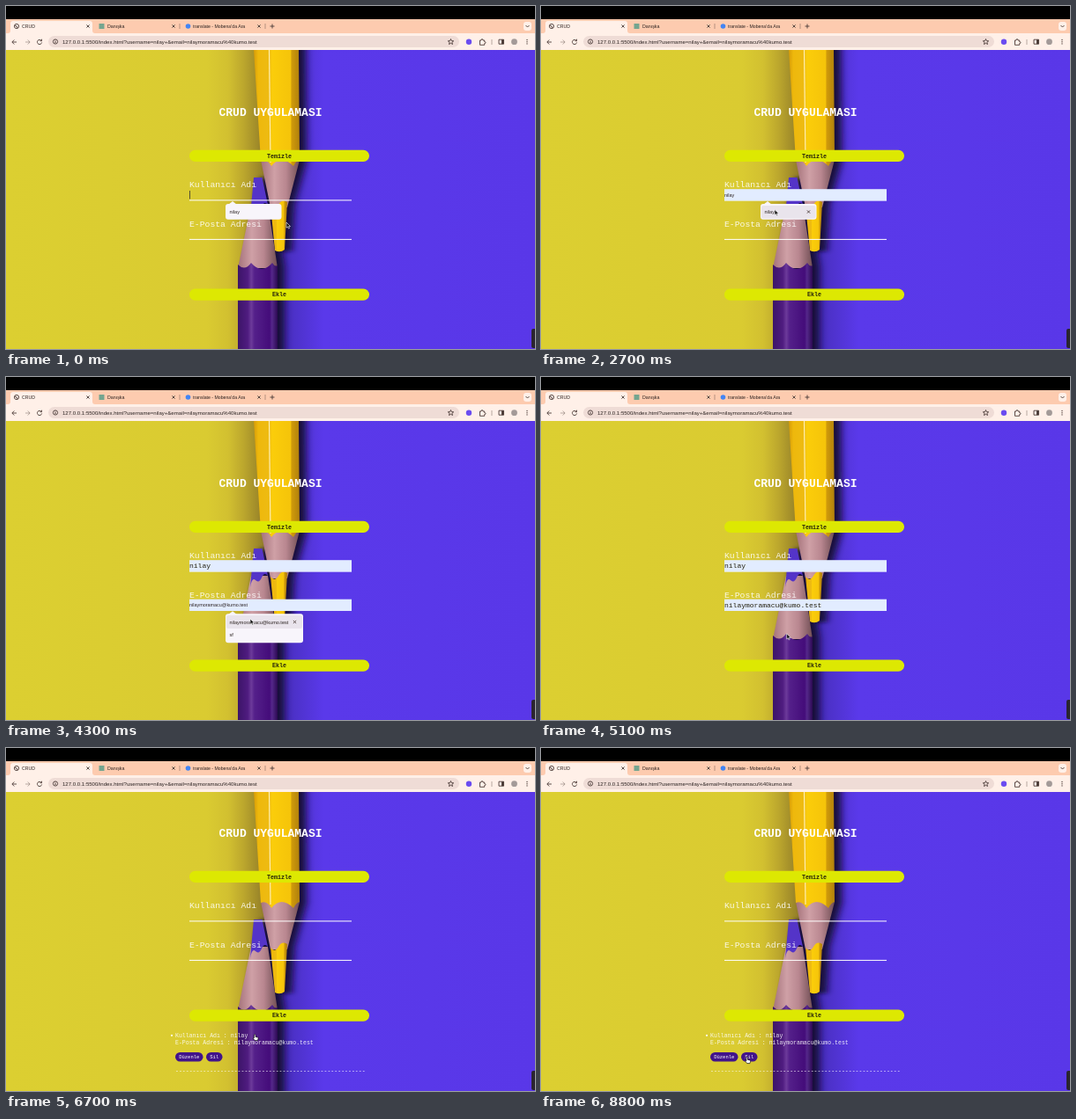
These frames come from a looping animation (600 px wide and 390 px high, 8900 ms). An HTML page:

```html
<!DOCTYPE html>
<html lang="tr">
<head>
<meta charset="utf-8">
<title>CRUD</title>
<style>
  html, body { margin: 0; width: 100%; height: 100%; overflow: hidden; background: #000; }
  svg { display: block; width: 600px; height: 390px; }
  text { white-space: pre; }
  .ui { font-family: "Liberation Sans", Arial, sans-serif; fill: #2b2220; }
  .mono { font-family: "Liberation Mono", "Courier New", monospace; fill: #fff; }
  .thin { fill-opacity: .88; }
  .bold { font-weight: bold; }
  .dark { fill: #24200c; }
  .line { fill: none; stroke: #4b3c38; stroke-width: .9; }
  .pale { opacity: .45; }
</style>
</head>
<body>
<svg viewBox="0 0 600 390" id="stage">
  <defs>
    <linearGradient id="paper" gradientUnits="userSpaceOnUse" x1="0" x2="600" y1="0" y2="0">
      <stop offset="0" stop-color="#dccf31"/>
      <stop offset=".38" stop-color="#dacb31"/>
      <stop offset=".42" stop-color="#d2c030"/>
      <stop offset=".45" stop-color="#bba62d"/>
      <stop offset=".488" stop-color="#927d28"/>
      <stop offset=".49" stop-color="#3d26a4"/>
      <stop offset=".55" stop-color="#4e32cc"/>
      <stop offset=".6" stop-color="#5a39ea"/>
      <stop offset="1" stop-color="#5937e8"/>
    </linearGradient>
    <linearGradient id="gold">
      <stop offset="0" stop-color="#d79c08"/>
      <stop offset=".1" stop-color="#eeb80c"/>
      <stop offset=".34" stop-color="#eebb12"/>
      <stop offset=".4" stop-color="#fbcd0a"/>
      <stop offset=".8" stop-color="#f5c40a"/>
      <stop offset=".83" stop-color="#cf9a0a"/>
      <stop offset="1" stop-color="#b0800c"/>
    </linearGradient>
    <linearGradient id="violet">
      <stop offset="0" stop-color="#3c1468"/>
      <stop offset=".25" stop-color="#4f1c80"/>
      <stop offset=".34" stop-color="#6c3a9a"/>
      <stop offset=".42" stop-color="#54208a"/>
      <stop offset=".8" stop-color="#440c7a"/>
      <stop offset=".86" stop-color="#54288a"/>
      <stop offset="1" stop-color="#2c0a52"/>
    </linearGradient>
    <linearGradient id="wood">
      <stop offset="0" stop-color="#a4727a"/>
      <stop offset=".35" stop-color="#cfa0a6"/>
      <stop offset=".65" stop-color="#b98790"/>
      <stop offset="1" stop-color="#704e54"/>
    </linearGradient>
    <filter id="soft" x="-1" y="-.2" width="3" height="1.4"><feGaussianBlur stdDeviation="4.500 2"/></filter>
    <clipPath id="page"><path d="M0 50H600V390H0z"/></clipPath>
    <path id="upper" d="M281 40H332L333 176 319 226 316 279H305L300 226 289 176z"/>
    <path id="lower" d="M281 195h9.500L298 228 308 297V400H263V297z"/>
  </defs>

  <rect y="15" width="600" height="17" fill="#fdcbaf"/>
  <path d="M2 31q3 0 3-3v-8q0-3 3-3h87q3 0 3 3v8q0 3 3 3z" fill="#fff0e8"/>
  <rect y="31" width="600" height="19" fill="#fff0e8"/>
  <rect x="48" y="34" width="466" height="13" rx="6.5" fill="#efdcd6"/>
  <rect x="587" y="18" width="9" height="10" rx="3" fill="#fff0e8"/>
  <g id="chrome"></g>

  <g id="photo" clip-path="url(#page)">
    <rect y="50" width="600" height="340" fill="url(#paper)"/>
    <g filter="url(#soft)" fill="#160e38">
      <use href="#upper" x="8"/>
      <use href="#lower" x="8"/>
    </g>
    <path d="M240 50H281L289 176 281 195 263 297V390H240z" fill="url(#paper)"/>
    <path d="M289 175H333L319 229H300z" fill="url(#wood)"/>
    <path d="M300 227q5 6 9-1t10-3l-3 54q-5 4-11 1z" fill="url(#gold)"/>
    <path d="M281 50H332L333 175q-4 1-7 7-14-14-25 0-5-9-12-6z" fill="url(#gold)"/>
    <path d="M298.500 50L300 178" stroke="#ffeeb0" stroke-width="1.200"/>
    <path d="M278 226H297L308 298H263z" fill="url(#wood)"/>
    <path d="M281 195h9.500L297 226q-4-5-7 2t-7 3-6 8z" fill="#5434c8"/>
    <path d="M263 390V294q8 8 15-2 12 14 24 0 3 5 6 3V390z" fill="url(#violet)"/>
  </g>

  <g id="form"></g>
  <g id="popups"></g>
  <rect x="596" y="367" width="6" height="22" rx="2" fill="#2a2530"/>

  <path class="pointer" id="arrow" d="M0 0V6.200L1.500 4.900 2.500 7.100 3.500 6.600 2.600 4.500H4.500z" fill="#111" stroke="#fff" stroke-width=".6"/>
  <path class="pointer" id="beam" d="M-1.500-3.500Q0-3.500 0-2.500Q0-3.500 1.500-3.500M0-2.500V2.500M-1.500 3.500Q0 3.500 0 2.500Q0 3.500 1.500 3.500" fill="none" stroke="#333" stroke-width=".8"/>
  <path class="pointer" id="hand" d="M-.600 0Q.300-1 1 .200V2.400L3.600 3Q4.300 3.400 4 4.600L3.400 6.600H.200L-1.800 4.100Q-1.600 3.200-.600 3.800z" fill="#fff" stroke="#111" stroke-width=".7"/>
</svg>

<script>
const LOOP = 8900, SUBMIT = 6100, SHIFT = -24;
const user = "nilay", mail = "nilaymoramacu@kumo.test";
const $ = id => document.getElementById(id);

const text = (x, y, size, str, cls = "ui", extra = "") =>
  `<text x="${x}" y="${y}" font-size="${size}" class="${cls}" ${extra}>${str}</text>`;
const rect = (x, y, w, h, fill, rx = 0) =>
  `<rect x="${x}" y="${y}" width="${w}" height="${h}" rx="${rx}" fill="${fill}"/>`;
const dot = (x, y, r, fill) => `<circle cx="${x}" cy="${y}" r="${r}" fill="${fill}"/>`;
const stroke = (d, cls = "") => `<path class="line ${cls}" d="${d}"/>`;
const cross = (x, y, r = 1.6) => stroke(`M${x - r} ${y - r}l${2 * r} ${2 * r}m0 ${-2 * r}l${-2 * r} ${2 * r}`);
// Content shown only during the given [from, to) spans
const during = (spans, body) => `<g data-on='${JSON.stringify(spans)}'>${body}</g>`;
const middle = 'text-anchor="middle"';

$("chrome").innerHTML =
  stroke("M9.400 23a2.600 2.600 0 1 0 5.200 0a2.600 2.600 0 1 0-5.200 0M10 22l2 1 1 2") +
  text(18, 24.9, 5.2, "CRUD") +
  rect(105.5, 20, 6, 6, "#74a58f") + text(115, 24.9, 5.3, "Danışka") +
  dot(206.5, 23, 2.8, "#4285f4") + text(212, 24.9, 5.2, "translate - Mobena'da Ara") +
  [93, 190, 287].map(x => cross(x, 23)).join("") +
  stroke("M197 20v6M294 20v6", "pale") +
  stroke("M299.500 23h5M302 20.500v5M589.500 22l2 2 2-2") +
  stroke("M12 41H7M9.300 38.500L6.800 41l2.500 2.500") +
  stroke("M22 41h5M24.700 38.500l2.500 2.500-2.500 2.500", "pale") +
  stroke("M40.200 39.500a2.600 2.600 0 1 0 .4 2M40.500 37.700v2h-2") +
  stroke("M53.400 40.500a2.600 2.600 0 1 0 5.200 0a2.600 2.600 0 1 0-5.200 0M56 40v2M56 38.700v.6") +
  text(64, 42.7, 6.05, `127.0.0.1:5500/index.html?username=${user}+&amp;email=${mail.replace("@", "%40")}`) +
  stroke("M504.500 37.500l.9 2.100 2.300.2-1.800 1.500.6 2.200-2-1.200-2 1.200.6-2.200-1.800-1.500 2.300-.2z") +
  dot(525, 40.7, 3.2, "#6a4cf0") +
  stroke("M537.500 39h1.500q0-1.500 1-1.500t1 1.500h1.700v1.600q1.300 0 1.300 1t-1.300 1v1.700h-5.200z") +
  stroke("M551 38v6", "pale") +
  stroke("M559 38.200h5.500v5h-5.500z") + rect(562, 38.2, 2.6, 5, "#4b3c38") +
  dot(576.5, 40.7, 3.4, "#a39a98") +
  [38.5, 40.7, 42.9].map(y => dot(591, y, .7, "#4b3c38")).join("");

const button = (y, label) =>
  rect(208, y, 204, 13.2, "#dde802", 6.6) +
  text(310, y + 8.7, 6.7, label, "mono bold dark", middle);
const field = (y, label) =>
  text(208, y - 14.3, 9.75, label, "mono thin") + rect(208, y - .1, 184, 1, "#fff");
const fill = (y, value, preview, filled) =>
  during([[preview, SUBMIT]], rect(208, y - 12.3, 184, 13.2, "#e2ecff")) +
  during([[preview, filled]], text(208, y - 3.7, 5.45, value)) +
  during([[filled, SUBMIT]], text(208, y - 3.2, 8, value, "mono dark"));
const pill = (x, w, label) =>
  rect(x, 370, w, 10.6, "#42148a", 5.3) + text(x + w / 2, 377, 5.5, label, "mono", middle);

$("form").innerHTML =
  text(300, 124.7, 13, "CRUD UYGULAMASI", "mono bold", middle) +
  button(163.8, "Temizle") + field(220.5, "Kullanıcı Adı") +
  field(265, "E-Posta Adresi") + button(321.6, "Ekle") +
  fill(220.5, user, 2400, 3000) + fill(265, mail, 4200, 4500) +
  during([[SUBMIT, LOOP]],
    dot(188, 350.8, 1.1, "#fff") +
    text(192, 353, 6.54, `Kullanıcı Adı : ${user}`, "mono thin") +
    text(192, 360.8, 6.54, `E-Posta Adresi : ${mail}`, "mono thin") +
    pill(192, 31.5, "Düzenle") + pill(227, 18.5, "Sil") +
    text(192, 393, 6.54, "-".repeat(55), "mono"));

const popup = (y, w, h) =>
  `<path d="M252 ${y + 1}l5-4 5 4z" fill="#f8f5fb"/>` + rect(249, y, w, h, "#f8f5fb", 3);
const caret = (y, spans) => during(spans, rect(208.2, y, .8, 9.5, "#333"));

$("popups").innerHTML =
  during([[0, 700], [1600, 3000]],
    popup(225, 63.5, 17.7) +
    during([[2400, 3000]], rect(250, 227, 61.5, 14.5, "#e9e4ec", 2) + cross(303.5, 234)) +
    text(253.5, 236, 5.6, user)) +
  during([[3700, 4500]],
    popup(269.3, 88, 33) +
    during([[4200, 4500]], rect(250, 271, 86, 15, "#e9e4ec", 2) + cross(327.5, 278.5)) +
    text(253.5, 280.6, 5.5, mail) + text(253.5, 295, 5.6, "sf")) +
  caret(210, [[0, 500], [1600, 2100]]) +
  caret(254, [[3700, 4200]]);

// Pointer route: time, x, y
const route = [
  [0, 318, 246], [500, 340, 285], [700, 340, 285], [1500, 220, 218.5], [2000, 220, 218.5],
  [2600, 265, 231.5], [2900, 265, 231.5], [3500, 257, 259], [3700, 257, 259],
  [4300, 277, 275], [4600, 277, 275], [5900, 282, 326], [7000, 282, 326],
  [7400, 296, 220], [7700, 287.5, 257], [8000, 240, 350], [8400, 215, 351],
  [8600, 215, 351], [8800, 233.5, 352], [LOOP, 233.5, 352]
];
const within = (t, spans) => spans.some(([a, b]) => t >= a && t < b);
const ease = p => p * p * (3 - 2 * p);

function pointerAt(t) {
  const i = route.findIndex(k => k[0] > t);
  const [t0, x0, y0] = route[i - 1], [t1, x1, y1] = route[i];
  const p = ease((t - t0) / (t1 - t0));
  return [x0 + (x1 - x0) * p, y0 + (y1 - y0) * p];
}

const pointerKind = t =>
  within(t, [[1300, 2200], [3300, 3900]]) ? "beam" :
  within(t, [[5700, 7100], [8000, LOOP]]) ? "hand" : "arrow";

const timed = [...document.querySelectorAll("[data-on]")]
  .map(el => ({ el, spans: JSON.parse(el.dataset.on) }));
const pointers = [...document.querySelectorAll(".pointer")];

function draw(t) {
  for (const { el, spans } of timed) el.style.display = within(t, spans) ? "" : "none";
  $("form").setAttribute("transform", `translate(0 ${t >= SUBMIT ? SHIFT : 0})`);
  const kind = pointerKind(t), [x, y] = pointerAt(t);
  for (const p of pointers) {
    p.style.display = p.id === kind ? "" : "none";
    p.setAttribute("transform", `translate(${x} ${y})`);
  }
}

function tick() {
  draw(Math.floor(performance.now() % LOOP / 100) * 100);
  requestAnimationFrame(tick);
}
tick();
</script>
</body>
</html>
```
